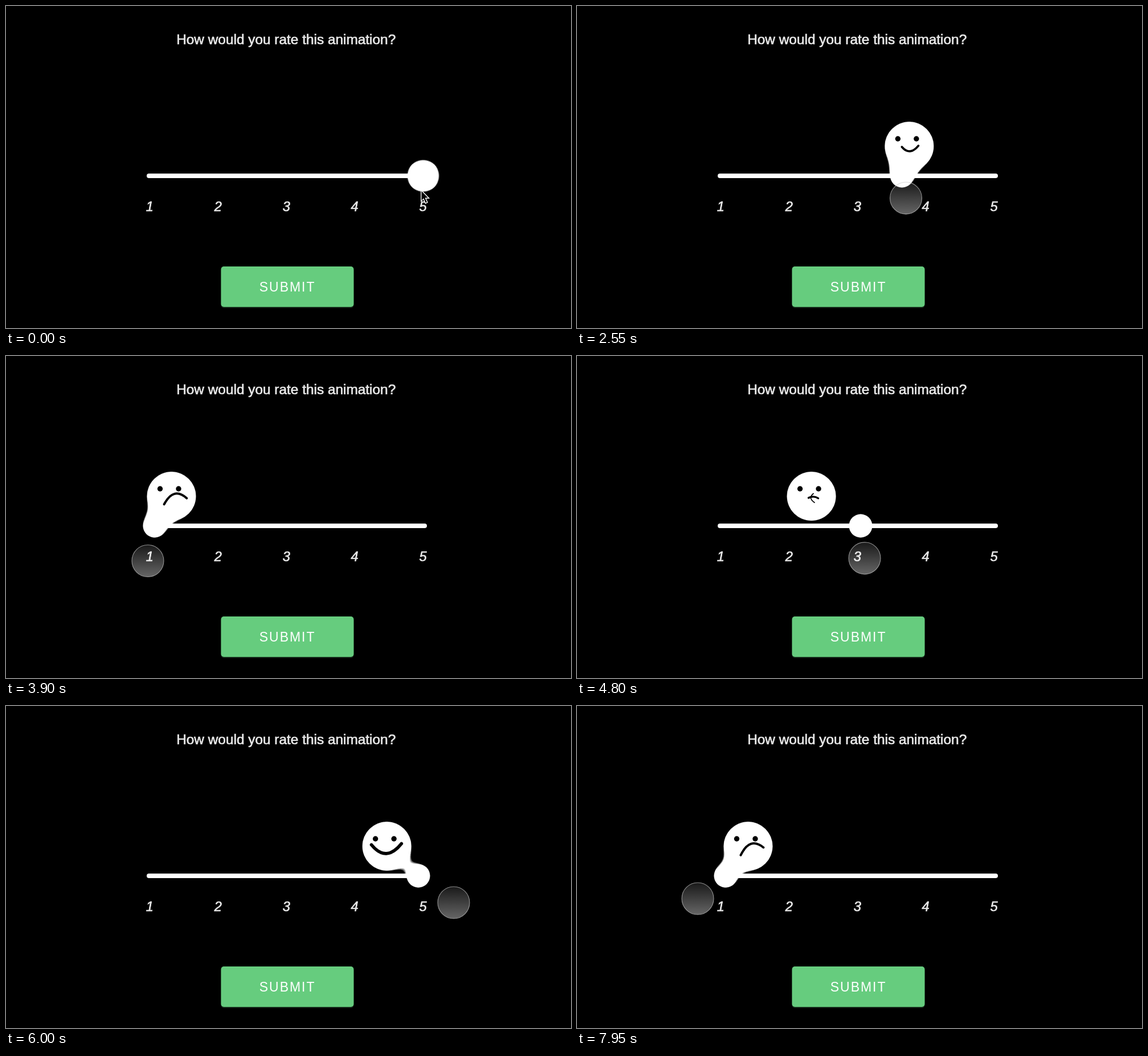
Write an HTML page that moves like this. It is 992 by 565 pixels and loops after 8000 ms.

```html
<!DOCTYPE html>
<html lang="en">
<head>
<meta charset="utf-8">
<title>Rating slider</title>
<style>
  html, body { margin: 0; width: 100%; height: 100%; overflow: hidden; background: #000; }
  svg { display: block; width: 992px; height: 565px; }
  text { font-family: "Liberation Sans", Arial, sans-serif; }
  .label { fill: #e8e8e8; stroke: #e8e8e8; stroke-width: .7; }
  .digits { font-size: 23.5px; font-style: italic; text-anchor: middle; }
</style>
</head>
<body>
<svg viewBox="0 0 992 565">
  <defs>
    <filter id="goo" filterUnits="userSpaceOnUse" x="0" y="0" width="992" height="565" color-interpolation-filters="sRGB">
      <feGaussianBlur stdDeviation="14"/>
      <feColorMatrix values="0 0 0 0 1  0 0 0 0 1  0 0 0 0 1  0 0 0 18 -6.2"/>
    </filter>
    <linearGradient id="glass" x2="0" y2="1">
      <stop offset="0" stop-color="#fff" stop-opacity=".1"/>
      <stop offset="1" stop-color="#fff" stop-opacity=".4"/>
    </linearGradient>
  </defs>
  <rect width="992" height="565"/>
  <text class="label" x="299.2" y="67.3" font-size="24.4">How would you rate this animation?</text>
  <g class="label digits" id="digits"></g>
  <rect x="377.5" y="459" width="233" height="71" rx="5" fill="#66cc7e" opacity=".2"/>
  <rect x="377.5" y="457" width="233" height="71" rx="5" fill="#66cc7e"/>
  <text x="444.8" y="501" font-size="23" letter-spacing="1.95" fill="#fff">SUBMIT</text>
  <rect x="247" y="294" width="492" height="8" rx="4" fill="#fff"/>
  <g fill="#fff">
    <g filter="url(#goo)"><rect id="softHead"/><rect id="softKnob"/></g>
    <rect id="head"/><rect id="knob"/>
  </g>
  <g id="face">
    <circle cx="-20" cy="-13" r="4.7"/>
    <circle cx="12.5" cy="-13" r="4.7"/>
    <path id="mouth" fill="none" stroke="#000" stroke-linecap="round"/>
    <path id="kink" d="M4-5Q-7 3 6 11.5" fill="none" stroke="#000" stroke-width="1.7"/>
  </g>
  <circle id="touch" r="28" fill="url(#glass)" stroke="#d2d2d2" stroke-opacity=".65" stroke-width="1.1"/>
  <path id="arrow" transform="translate(728.8 323)" d="M0 0V19.5L4.3 15.6L7.6 23.2L11.2 21.6L7.9 14.3H13.8Z" fill="#000" stroke="#fff" stroke-width="1.4"/>
</svg>
<script>
const LOOP = 8000, STEP = 150, TICK = 10;
const PRESS = 600, GROW = 400;
const LEFT = 261, RIGHT = 724, MIDDLE = (LEFT + RIGHT) / 2;
const HEAD_LAG = 200, MOOD_LAG = 80;
const REST = { x: 732.5, y: 298, r: 25.7 };

// Where the finger goes: time and position
const dragX = [[1650, 730], [2100, 602], [2550, 577.5], [3150, 475], [3900, 249], [4200, 242],
  [4800, 505], [5250, 607], [5750, 625], [6000, 786], [6700, 1025], [7350, 708], [7600, 265], [7950, 212]];
const dragY = [[1650, 325], [3900, 359.5], [6000, 345], [7950, 338]];

const $ = id => document.getElementById(id);
const set = (id, attrs) => {
  for (const k in attrs) $(id).setAttribute(k, attrs[k]);
};
const show = (id, on) => set(id, { visibility: on ? "inherit" : "hidden" });
const mix = (a, b, p) => a + (b - a) * p;
const clamp = (v, lo, hi) => Math.min(hi, Math.max(lo, v));

// Monotone cubic through the given points
function along(pts, x) {
  const last = pts.length - 1;
  if (x <= pts[0][0]) return pts[0][1];
  if (x >= pts[last][0]) return pts[last][1];
  let i = 0;
  while (x > pts[i + 1][0]) i++;
  const slope = j => (pts[j + 1][1] - pts[j][1]) / (pts[j + 1][0] - pts[j][0]);
  const tangent = j => {
    if (j === 0 || j === last) return 0;
    const a = slope(j - 1), b = slope(j);
    return a * b > 0 ? 2 * a * b / (a + b) : 0;
  };
  const [x0, y0] = pts[i], [x1, y1] = pts[i + 1];
  const h = x1 - x0, u = (x - x0) / h, v = 1 - u;
  return y0 * (1 + 2 * u) * v * v + tangent(i) * h * u * v * v
    + y1 * u * u * (3 - 2 * u) - tangent(i + 1) * h * u * u * v;
}

const knobAt = t => clamp(along(dragX, t) - 7, LEFT, RIGHT);

// A value that trails the knob, sampled once per TICK
function trail(lag) {
  const ease = 1 - Math.exp(-TICK / lag);
  const path = [knobAt(0)];
  for (let t = TICK; t < LOOP; t += TICK) {
    const x = path[path.length - 1];
    path.push(x + (knobAt(t) - x) * ease);
  }
  return t => path[Math.floor(t / TICK)];
}
const headAt = trail(HEAD_LAG), moodAt = trail(MOOD_LAG);

function blob(id, x, y, r, round) {
  set(id, { x: x - r, y: y - r, width: 2 * r, height: 2 * r, rx: r * round });
}

// mood runs from -1 (sad) to 1 (happy); a sad mouth tilts as the head lags
function drawMouth(mood, lag) {
  const happy = mood > 0, size = Math.abs(mood);
  const half = 7 + (happy ? 21 : 13) * size;
  const sag = (happy ? 16.5 : 13) * Math.sin(mood * Math.PI / 2);
  const tilt = -2 + 0.28 * lag * Math.max(-mood, 0);
  const x = 3 - 4 * mood, y = 2.5 - 6.5 * mood;
  set("mouth", {
    d: `M${x - half} ${y - tilt / 2}Q${x + tilt * 0.3} ${y + 2 * sag} ${x + half} ${y + tilt / 2}`,
    "stroke-width": 3.4 + (happy ? 2.6 : 0.6) * size * size
  });
  show("kink", size < 0.15);
}

function draw(t) {
  const pressed = t >= PRESS;
  const p = 1 - (1 - clamp((t - PRESS) / GROW, 0, 1)) ** 3;
  const knob = knobAt(t), head = headAt(t);
  const hx = mix(REST.x, head - 2, p), hy = mix(REST.y, 246, p), hr = mix(REST.r, 42.8, p);
  const kx = mix(REST.x, knob, p), kr = mix(REST.r, 20.4, p);
  const round = mix(0.84, 1, p);

  blob("softHead", hx, hy, hr - 2.4, round);
  blob("softKnob", kx, REST.y, kr, round);
  blob("head", hx, hy, hr, round);
  blob("knob", kx, REST.y, kr, round);
  set("face", { transform: `translate(${hx} ${hy}) scale(${p})` });
  drawMouth((moodAt(t) - MIDDLE) / (RIGHT - MIDDLE), knob - head);
  set("touch", { cx: along(dragX, t), cy: along(dragY, t) });
  show("face", pressed);
  show("touch", pressed);
  show("arrow", !pressed);
}

$("digits").innerHTML = [1, 2, 3, 4, 5]
  .map(n => `<text x="${132.5 + 119.9 * n}" y="360.3">${n}</text>`).join("");

const start = performance.now();
function tick() {
  const t = (performance.now() - start) % LOOP;
  draw(Math.floor(t / STEP) * STEP);
  requestAnimationFrame(tick);
}
tick();
</script>
</body>
</html>
```
